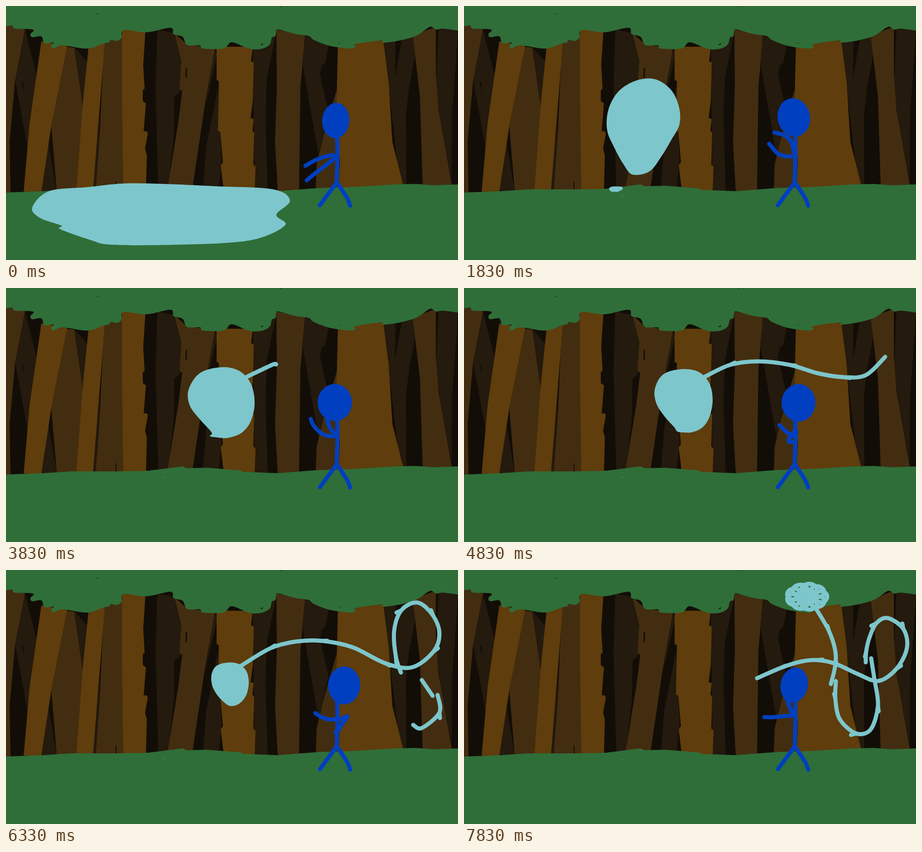
Animation, 998 px wide and 561 px high, one loop 8000 ms. Source, as an HTML page:

```html
<!DOCTYPE html>
<html lang="en">
<head>
<meta charset="utf-8">
<title>Water in the forest</title>
<style>
  html, body { margin: 0; width: 100%; height: 100%; overflow: hidden; }
  svg { display: block; width: 100%; height: 100%; }
  .dim { fill: #241a0d; }
  .mid { fill: #432d10; }
  .lit { fill: #5f3d0c; }
  .black { fill: #120d07; }
  .leaf { fill: #2f6e39; }
  .water { fill: #7dc6cc; }
  .line { fill: none; stroke-width: 9; stroke-linecap: round; stroke-linejoin: round; }
  .jet { stroke: #7dc6cc; }
  .ink { stroke: #003fbf; }
</style>
</head>
<body>
<svg viewBox="0 0 998 561" preserveAspectRatio="none">
  <rect class="black" width="998" height="561"/>

  <path class="dim" d="M42 53L68 155 112 408H65L20 163Z"/>
  <path class="dim" d="M152 92L185 130 168 222ZM209 225L198 405H190Z"/>
  <path class="dim" d="M334 52L373 60 387 110 384 190 372 200 371 285 358 400H336L330 180Z"/>
  <path class="dim" d="M460 92L466 108 440 225ZM468 180L476 340 470 400H435L442 310Z"/>
  <path class="dim" d="M545 88L597 56 576 160 573 250 578 410H549Z"/>
  <path class="dim" d="M660 62L712 88 706 122Q704 132 698 130L693 150 712 235 690 330 655 130Z"/>
  <path class="dim" d="M833 78L860 76 859 158 874 72 900 68 905 100 890 180 883 240 884 396H870Z"/>
  <path class="dim" d="M955 48L998 53 992 145 985 240 984 385 960 260 949 180Z"/>

  <path class="mid" d="M0 40L42 51 20 165 8 300 10 414H0Z"/>
  <path class="mid" d="M133 90L151 92 169 222 155 408H112L100 265Z"/>
  <path class="mid" d="M216 80L256 65 260 408H198L208 265Z"/>
  <path class="mid" d="M372 60L400 85 461 93 438 225 412 400H357L380 260 389 188 383 183 387 120Z"/>
  <path class="mid" d="M597 52L660 63 650 180 647 410H600L594 300 598 180Z"/>
  <path class="mid" d="M730 185L737 404 684 402 686 350 700 290Z"/>
  <path class="mid" d="M898 65L949 46 949 150 955 230 985 398H920L914 200Z"/>

  <path class="lit" d="M78 78L135 88 100 265 78 410H39L52 260Z"/>
  <path class="lit" d="M183 83L218 79 208 210 192 408H155L169 220Z"/>
  <path class="lit" d="M256 52H308L303 130 306 183 302 186V210L309 215 304 277Q313 275 313 283L307 315 311 330 309 408H259L256 200Z"/>
  <path class="lit" d="M465 90H545L541 122 547 125 545 210 540 247 547 250 544 275 548 280 546 350 551 355 549 408H481L474 352 479 345 473 278 468 275 470 166 465 163Z"/>
  <path class="lit" d="M733 80L833 76 845 170 853 300 877 396 735 402 737 340 729 250Z"/>
  <path class="black" d="M397 135l3 4-1 22-3-4ZM35 168l3 0 2 24ZM242 387h2v20h-2Z"/>

  <path class="leaf" d="M0 412L80 409 145 405 245 405 310 404 390 394 398 398 445 397 520 403 522 406 600 409 690 402 760 400 860 394 905 393 945 396 998 394V561H0Z"/>
  <path class="leaf" id="canopy"/>
  <path class="black" d="M561 86L568 82 566 86ZM733 81L743 83 735 82ZM201 17h2v2h-2ZM605 0h3v1h-3Z"/>
  <path d="M349 420l2-3M309 406l2-2M422 435l1 1" stroke="#7dc6cc" opacity=".6"/>

  <path class="water" id="pond"/>
  <path class="water" id="blob"/>
  <path class="line jet" id="stream"/>
  <path class="line jet" id="cloud"/>

  <path class="line ink" d="M731 282L732 335 730 390 693 440M731 390Q746 412 755 427L760 441"/>
  <path class="line ink" id="armA"/>
  <path class="line ink" id="armB"/>
  <ellipse id="head" fill="#003fbf"/>
</svg>
<script>
const LOOP = 8000, FPS = 6, TAU = Math.PI * 2;
const el = id => document.getElementById(id);
const nums = text => text.trim().split(/[\s,]+/).map(Number);
const mix = (a, b, k) => a + (b - a) * k;

// Keys are [tick, flat number list]; a shorter list borrows its missing values.
const keyed = keys => keys.map(([tick, v]) => [tick, typeof v === 'string' ? nums(v) : v]);
function tween(keys, tick) {
  const i = Math.max(0, keys.findLastIndex(k => k[0] <= tick));
  const [t0, a] = keys[i], [t1, b] = keys[i + 1] || keys[i];
  const k = t1 > t0 ? Math.max(0, (tick - t0) / (t1 - t0)) : 0;
  const size = Math.max(a.length, b.length);
  return Array.from({ length: size }, (_, n) => mix(a[n] ?? b[n], b[n] ?? a[n], k));
}

const pairs = flat => Array.from({ length: flat.length / 2 }, (_, i) => [flat[2 * i], flat[2 * i + 1]]);

// Catmull-Rom curve through the points.
function curve(pts, closed) {
  const n = pts.length;
  const at = i => closed ? pts[(i + n) % n] : pts[Math.min(n - 1, Math.max(0, i))];
  let d = 'M' + pts[0];
  for (let i = 0; i < (closed ? n : n - 1); i++) {
    const [p, q, r, s] = [at(i - 1), at(i), at(i + 1), at(i + 2)];
    const c1 = q.map((v, j) => v + (r[j] - p[j]) / 6);
    const c2 = r.map((v, j) => v - (s[j] - q[j]) / 6);
    d += `C${c1} ${c2} ${r}`;
  }
  return d + (closed ? 'Z' : 'h0');
}

// Clockwise from the bottom.
const oval = (cx, cy, rx, ry, n = 14) => Array.from({ length: n }, (_, i) => {
  const a = TAU * (0.25 + i / n);
  return [cx + rx * Math.cos(a), cy + ry * Math.sin(a)];
}).flat();

const pondKeys = keyed([
  [0, '58,445 95,409 180,400 260,392 350,393 460,398 590,405 627,430 597,461 617,483 565,511 490,523 340,528 230,527 190,518 120,493 122,485 75,468'],
  [7, '262,415 272,402 295,395 320,393 345,393 370,394 400,395 411,412 409,426 402,431 385,439 368,447 350,453 320,451 300,452 285,449 270,438 263,425'],
  [12, oval(335, 400, 0, 0, 18)],
]);
const blobKeys = keyed([
  [0, oval(335, 415, 60, 8)],
  [7, '322,393 344,345 349,292 337,255 347,208 378,171 430,157 472,169 493,216 482,272 450,309 395,323 365,352 352,393'],
  [13, oval(397, 260, 94, 102)],
  [16, '408,318 380,305 358,288 343,268 337,242 352,208 415,183 462,192 492,220 500,248 488,276 470,290 440,305 420,314'],
  [21, oval(449, 255, 82, 90)],
  [23, '450,327 454,319 428,290 406,260 403,225 428,188 475,175 515,183 541,212 549,255 540,295 520,320 490,331 466,330'],
  [34, '488,308 472,297 455,278 440,250 437,220 450,193 485,183 520,187 542,208 549,240 544,275 532,298 515,308 500,310'],
  [42, '494,290 486,283 476,272 470,258 471,240 480,230 495,226 510,229 520,240 523,255 520,270 512,280 507,287 500,291'],
  [46, oval(618, 237, 3, 3)],
  [47, oval(647, 239, 0, 0)],
]);
const streamKeys = keyed([
  [34, '530,197 587,170 650,162 720,170 780,188 840,197 888,192 930,152 942,110 925,68 880,28 838,48 820,90 822,160 834,212'],
  [42, '505,228 580,176 630,154 675,143 750,153 835,215 905,238 958,208 972,170 960,132 938,116 908,130 894,180 900,225 910,241 ' +
       '918,243 942,278 953,276 957,315 918,349 880,335 856,280 857,220 865,175 856,148 851,141 851,141 851,141 851,141 851,141'],
  [47, '647,239 700,216 745,202 780,199 820,207 870,230 915,245 955,218 978,172 970,130 935,106 910,118 895,150 888,180 887,204 ' +
       '899,195 906,240 907,245 914,300 898,352 866,361 830,330 820,285 821,248 821,248 810,252 819,215 820,180 806,135 777,85'],
]);
const strokeStarts = [0, 15, 17, 25, 30];
const growth = [[0, [0]], [21, [0]], [23, [1.15]], [28, [5.6]], [34, [14]], [42, [25]], [47, [29]]];
const cloudSize = [[0, [0]], [44, [0]], [47, [1]]];

// cx, cy, rx, ry, tilt
const headKeys = keyed([
  [0, '728 253 30 39 4'], [7, '730 238 38 44 0'], [16, '726 256 33 41 -24'], [23, '726 253 38 41 0'],
  [34, '749 254 37 42 0'], [42, '744 256 34 42 4'], [47, '729 254 30 39 12'],
]);
const armAKeys = keyed([
  [0, '722,329 700,334 680,342 661,353'],
  [7, '727,322 722,302 710,284 697,269'],
  [16, '731,325 724,300 708,290 671,292'],
  [23, '725,322 715,308 710,295 709,285'],
  [34, '731,333 715,330 700,324 686,318'],
  [42, '730,326 710,330 692,325 680,314'],
  [47, '725,321 705,323 685,325 663,325'],
]);
const armBKeys = keyed([
  [0, '728,333 716,344 703,354 690,364 677,374 664,385'],
  [7, '724,328 715,324 706,319 697,315 688,312 679,310'],
  [16, '728,337 705,342 683,338 672,325 668,308 667,297'],
  [23, '731,327 715,327 700,323 688,314 678,302 673,289'],
  [34, '733,335 745,333 760,308 747,340 750,370 766,382'],
  [42, '733,329 756,315 745,345 718,367 706,348 711,314'],
  [47, '726,318 720,305 715,292 712,282 711,278 711,275'],
]);

function streamPath(tick) {
  const [reach] = tween(growth, tick);
  if (reach <= 0) return '';
  const pts = pairs(tween(streamKeys, tick));
  let d = '';
  strokeStarts.slice(0, -1).forEach((start, s) => {
    if (reach < start) return;
    const last = Math.min(reach, strokeStarts[s + 1] - 1), whole = Math.floor(last);
    const part = pts.slice(start, whole + 1);
    if (last > whole) part.push(pts[whole].map((v, j) => mix(v, pts[whole + 1][j], last - whole)));
    d += curve(part);
    // Overshooting brush ends
    for (let i = start + 1; i < whole; i += 2) {
      const dx = pts[i][0] - pts[i - 1][0], dy = pts[i][1] - pts[i - 1][1];
      const k = 12 / (Math.hypot(dx, dy) || 1);
      d += `M${pts[i]}l${dx * k},${dy * k}`;
    }
  });
  return d;
}

function cloudPath(size) {
  if (!size) return '';
  const ring = (rx, ry, loop, turns) => curve(Array.from({ length: 80 }, (_, i) => {
    const a = TAU * i / 80;
    return [757 + size * (rx * Math.cos(a) + loop * Math.cos(turns * a)),
            mix(85, 59, size) + size * (ry * Math.sin(a) + loop * 0.8 * Math.sin(turns * a))];
  }), true);
  return ring(34, 20, 11, 10) + ring(14, 8, 9, 7);
}

el('canopy').setAttribute('d', curve(pairs(nums(
  '-20,-20 1018,-20 1018,54 998,54 965,50 950,52 942,47 934,47 905,66 870,76 833,81 828,76 772,84 772,90 760,94 715,88 680,75 668,66 ' +
  '640,62 603,52 597,54 595,66 587,70 583,84 570,93 550,96 530,92 498,80 480,94 435,94 428,87 400,86 390,68 370,62 363,48 ' +
  '310,58 260,53 255,70 245,77 231,75 228,80 215,83 180,94 125,87 105,94 100,88 105,81 85,82 78,67 58,69 54,62 60,52 20,50 12,43 -20,43')), true));

function draw() {
  const tick = Math.floor((performance.now() % LOOP + 4) * FPS / 1000) % (LOOP * FPS / 1000);
  const set = (id, d) => el(id).setAttribute('d', d);
  set('pond', curve(pairs(tween(pondKeys, tick)), true));
  set('blob', curve(pairs(tween(blobKeys, tick)), true));
  set('stream', streamPath(tick));
  set('cloud', cloudPath(tween(cloudSize, tick)[0]));
  set('armA', curve(pairs(tween(armAKeys, tick))));
  set('armB', curve(pairs(tween(armBKeys, tick))));
  const [cx, cy, rx, ry, tilt] = tween(headKeys, tick);
  Object.entries({ cx, cy, rx, ry, transform: `rotate(${tilt} ${cx} ${cy})` })
    .forEach(([name, value]) => el('head').setAttribute(name, value));
  requestAnimationFrame(draw);
}
draw();
</script>
</body>
</html>
```
